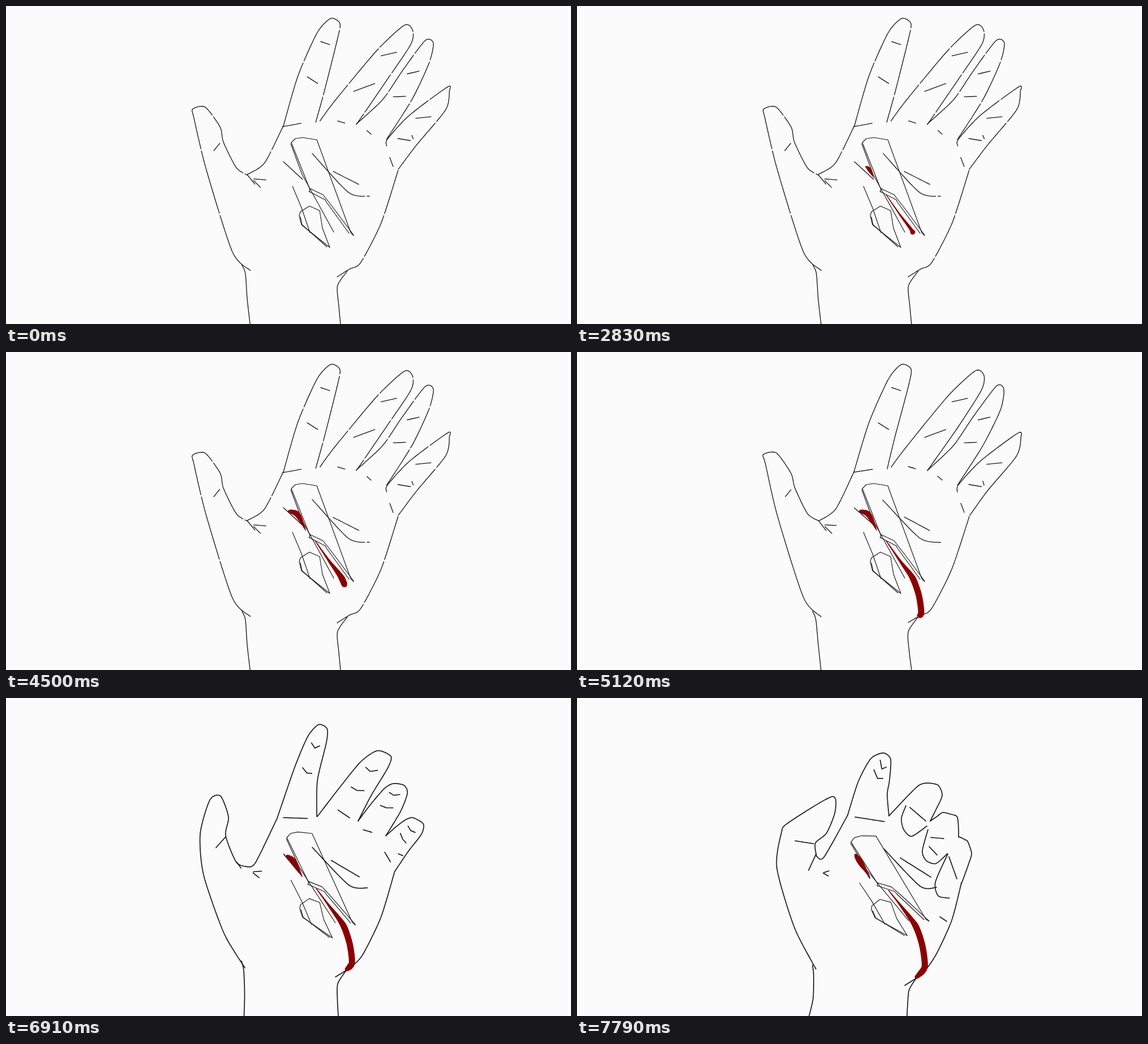
An HTML page with a canvas that plays this animation: 998 px wide and 561 px high, repeating every 8 s.

```html
<!DOCTYPE html>
<html lang="en">
<head>
<meta charset="utf-8">
<title>Closing hand</title>
<style>
  html, body { margin: 0; width: 100%; height: 100%; overflow: hidden; background: #fbfbfb; }
  canvas { display: block; width: 100vw; height: 100vh; }
</style>
</head>
<body>
<canvas width="998" height="561"></canvas>
<script>
const ctx = document.querySelector('canvas').getContext('2d');
const LOOP = 8000, INK = '#1c1a1b', BLOOD = '#8b0000', PAPER = '#fbfbfb';

const clamp = (v, lo, hi) => Math.max(lo, Math.min(hi, v));
const lerp = (a, b, k) => a + (b - a) * k;
const toward = (a, b, k) => [lerp(a[0], b[0], k), lerp(a[1], b[1], k)];
const noise = n => { const v = Math.sin(n * 127.1) * 43758.5; return v - Math.floor(v); };

const points = s => s.split(' ').map(p => p.split(',').map(Number));
const keys = s => s.split(' > ').map(points);

// Shape at a fold from 0 (open) to 2 (fist), keys evenly spaced; below 0 it extrapolates.
function shape(poses, fold) {
  const k = fold * (poses.length - 1) / 2;
  const i = clamp(Math.floor(k), 0, poses.length - 2);
  return poses[i].map((p, n) => toward(p, poses[i + 1][n], k - i));
}

// Point on the soft curve through p, where u counts points.
function at(p, u) {
  const i = clamp(Math.floor(u), 0, p.length - 2), f = u - i, g = 1 - f;
  const b = p[i], c = p[i + 1], a = p[i - 1] || b, d = p[i + 2] || c;
  return [0, 1].map(n => g * g * g * b[n] + 3 * g * g * f * (b[n] + (c[n] - a[n]) / 8) +
    3 * g * f * f * (c[n] - (d[n] - b[n]) / 8) + f * f * f * c[n]);
}
const sample = (p, from, to, n) => Array.from({ length: n + 1 }, (_, i) => at(p, lerp(from, to, i / n)));
const curve = p => sample(p, 0, p.length - 1, (p.length - 1) * 10);

// Outlines run from one root over the tip to the other root: open > half > fist
const fingers = [
  '489,212 516,124 550,48 573,22 590,30 586,58 561,152 548,206 > 479,212 510,122 533,68 552,47 567,54 566,78 550,146 549,209 > 478,207 497,147 519,107 541,97 554,108 552,145 548,170 551,208',
  '555,203 582,167 655,78 704,33 719,42 714,68 672,134 619,209 > 550,209 590,157 627,112 656,93 680,103 674,124 645,172 622,217 > 551,208 585,172 604,154 619,150 638,154 645,172 634,197 624,217',
  '619,209 665,165 700,114 741,60 754,66 748,102 717,165 672,235 > 622,217 643,189 668,160 684,151 703,154 709,168 697,200 671,243 > 624,217 636,209 646,202 660,205 670,208 673,216 674,235 674,245',
  '672,247 674,234 713,192 779,143 784,152 776,184 725,245 694,288 > 671,243 688,228 704,216 718,211 737,222 734,240 711,270 686,307 > 674,245 680,247 685,250 690,253 697,274 692,292 680,325 679,326'
].map(keys);

const thumb = [
  '431,467 400,433 354,289 333,198 329,181 352,178 378,214 385,240 407,285 427,298 > 422,476 385,415 349,312 343,240 360,180 379,173 393,210 388,243 407,290 427,298 > 422,478 384,405 353,300 361,238 372,221 450,174 456,200 441,238 421,256 423,279',
  '427,298 440,315 > 408,290 415,300 > 422,276 409,304',
  '378,243 368,255 > 388,245 371,264 > 418,257 385,252'
].map(keys);

const palm = [
  '427,298 457,277 489,212 > 427,298 441,290 479,212 > 423,279 436,281 478,207',
  '693,290 662,383 626,453 606,465 585,477 > 679,326 662,392 634,453 610,486 579,507',
  '602,468 585,494 587,530 591,561 > 603,489 587,514 584,540 583,561',
  '416,457 422,473 426,515 431,561 > 416,471 418,490 417,530 410,561',
  '540,261 605,328 642,336 > 542,266 606,332 635,334',
  '578,291 623,315 > 571,282 625,316',
  '490,275 524,305 > 491,276 517,318',
  '489,212 522,207 > 491,210 543,218',
  '438,308 450,320 > 435,309 444,314',
  '438,305 458,306 > 436,308 445,305',
  '585,202 598,206 > 588,193 616,217',
  '637,219 645,226 > 625,246 648,248',
  '678,267 684,283 > 669,272 679,289 > 657,280 671,319',
  '717,228 719,235 > 693,275 701,278 > 641,386 653,394'
].map(keys);

// Finger ends that bend over the palm
const curls = [
  '581,190 573,212 577,232 591,244 618,226',
  '620,232 610,270 617,287 634,292 654,275',
  '622,262 636,277',
  '655,275 633,325 638,349 658,353'
].map(points);

// Angular figure on the palm
const figure = [
  '504,241 511,234 524,232 549,236 609,400 614,405',
  '504,241 537,324',
  '503,243 523,297 579,399',
  '536,328 537,322 560,333 575,352 614,404',
  '535,327 564,342 566,346 606,401',
  '520,363 536,353 554,361 559,392 572,426 522,386 518,370 520,363',
  '520,372 523,386 567,425',
  '506,318 522,356 537,400'
].map(points);

const cut = keys('498,280 513,285 521,297 530,316 > 491,275 498,286 507,300 518,317');
const stream = keys('546,333 571,369 593,399 604,430 608,460 602,467 > 550,339 574,369 598,402 610,437 614,475 598,494');

const redraws = [1000, 1950, 2910, 4080, 5120];
const folding = [[0, 0], [6200, -.12], [6660, .15], [6910, 1], [7160, 1.27], [7370, 1.5], [7580, 1.72], [7790, 2]];

function path(p) {
  ctx.beginPath();
  p.forEach(q => ctx.lineTo(...q));
}
function ink(p, width, color = INK) {
  path(p);
  ctx.lineWidth = width;
  ctx.strokeStyle = color;
  ctx.stroke();
}
function dot([x, y], r) {
  ctx.beginPath();
  ctx.arc(x, y, r, 0, 7);
  ctx.fill();
}

// Filled band along part of a curve; width depends on the place u.
function ribbon(p, from, to, width) {
  const n = 36, mid = sample(p, from, to, n);
  const edge = side => mid.map(([x, y], i) => {
    const a = mid[Math.max(0, i - 1)], b = mid[Math.min(n, i + 1)];
    const dx = b[0] - a[0], dy = b[1] - a[1];
    const w = side * width(lerp(from, to, i / n)) / 2 / (Math.hypot(dx, dy) || 1);
    return [x - dy * w, y + dx * w];
  });
  path([...edge(1), ...edge(-1).reverse()]);
  ctx.fill();
}

// Crease across a finger, at a share of the way from root to tip
function crease(outline, share, fold, width) {
  const left = at(outline, 3 * share), right = at(outline, 7 - 3 * share);
  const root = toward(outline[0], outline[7], .5);
  const mid = toward(toward(left, right, .52), root, .05 * fold);
  ink([toward(left, right, .3), mid, toward(left, right, .72)], width);
}

// The figure slants as the palm closes.
function slant([x, y], fold) {
  const k = .3 * fold + .1 * fold * fold;
  return [x + k * (.17 * (y - 241) - 20), y + k * (13 - .13 * (x - 505) - .06 * (y - 241))];
}

function drawHand(fold, thumbFold, loose) {
  const width = fold > 0 ? 1.7 : 1.35;
  const line = (p, n) => {
    if (loose) {
      ctx.setLineDash([60 + 70 * noise(n), 4]);
      p = p.map(([x, y], i) => [x + 2 * noise(n + i) - 1, y + 2 * noise(n + i + 50) - 1]);
    }
    ink(curve(p), width);
    ctx.setLineDash([]);
  };
  palm.forEach((k, n) => line(shape(k, fold), n));
  thumb.forEach((k, n) => line(shape(k, thumbFold), n + 20));
  fingers.forEach((k, n) => {
    const outline = shape(k, fold), tip = Math.max(0, fold - 1) * .2;
    line(outline, n + 30);
    if (n && fold > 1.4) return;
    crease(outline, .6 + tip, fold, width);
    crease(outline, .37 + tip, fold, width);
  });
  if (fold > 1) curls.forEach(p => ink(curve(p.map(q => toward(p[0], q, fold - 1))), width));
}

function drawBlood(t, fold) {
  if (t < 700) return;
  const growth = clamp(Math.floor((t - 700) / 210) * .075, 0, 1), spread = growth * growth;
  const run = clamp((Math.floor((t - 4500) / 88.5) + 1) / 8, 0, 1);
  const wound = shape(cut, fold), flow = shape(stream, fold), end = 2 + 3 * run;
  ctx.fillStyle = BLOOD;

  const from = 1.6 * (1 - spread), to = 1.6 + 1.4 * spread;
  dot(at(wound, 1.6), 1 + growth * 2);
  ribbon(wound, from, to, u => (2 + 8 * spread) * Math.sin(Math.PI * ((u - from) / (to - from || 1)) ** .7));

  ribbon(flow, 0, end, u =>
    .5 + growth + 9.5 * spread * Math.min(1, u / 2) ** 1.6 * Math.min(1, .4 + 5 - u));
  dot(at(flow, end), (1 + 4.5 * growth) * (1 - run) + run);
}

function draw(t) {
  const fold = folding.filter(s => s[0] <= t).pop()[1];
  const loose = t < 5120 && redraws.filter(s => s <= t).length % 2 === 0;
  const thumbFold = fold && fold < 1 ? fold - .45 : fold;
  ctx.fillStyle = PAPER;
  ctx.fillRect(0, 0, 998, 561);
  drawHand(fold, thumbFold, loose);
  figure.forEach(p => ink(p.map(q => slant(q, fold)), 1.15));
  drawBlood(t, fold);
}

ctx.lineCap = ctx.lineJoin = 'round';
const start = performance.now();
function tick() {
  draw((performance.now() - start) % LOOP);
  requestAnimationFrame(tick);
}
tick();
</script>
</body>
</html>
```
